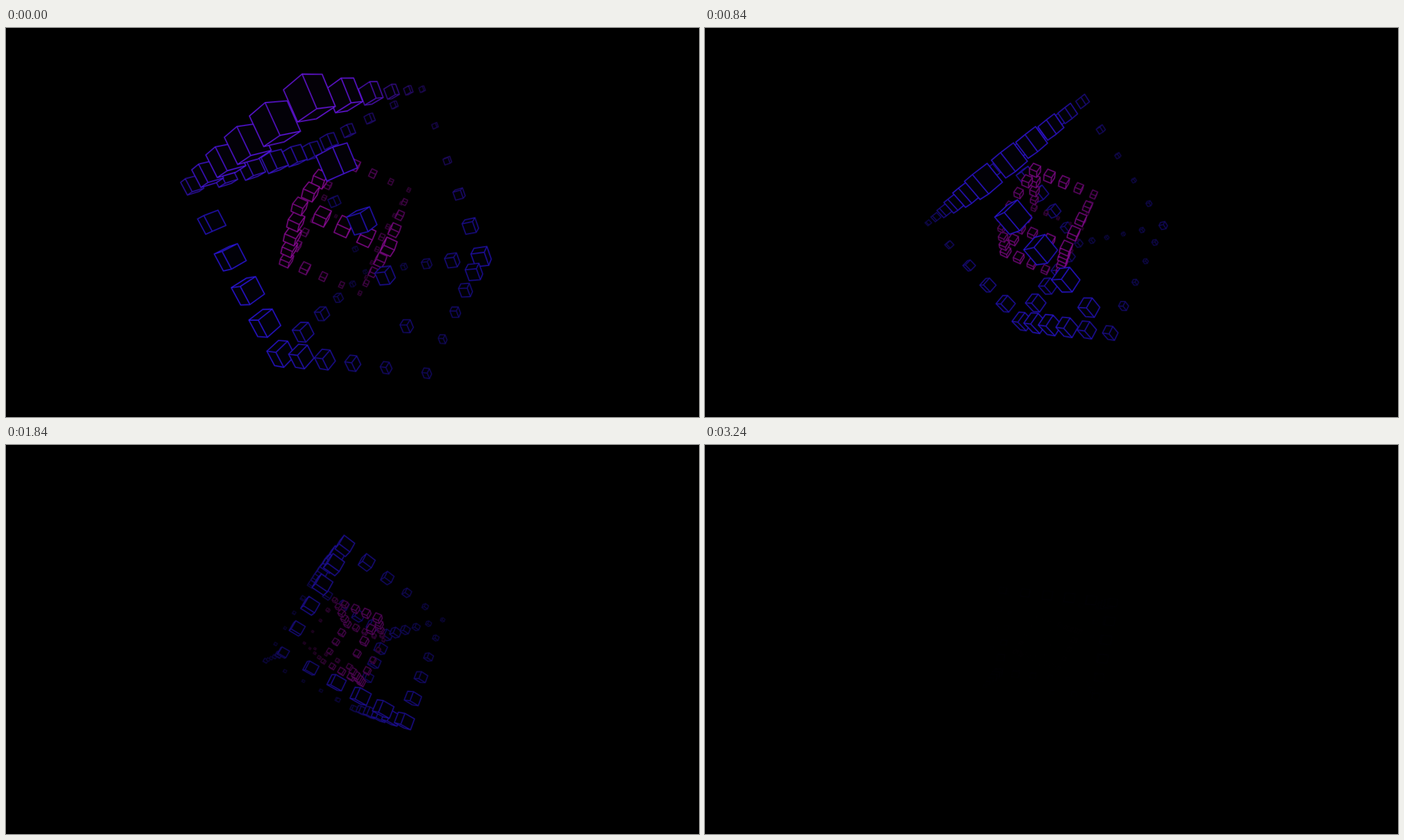
Animation, 998 px wide and 561 px high, one loop 3280 ms. Source, as an HTML page with a canvas:

```html
<!DOCTYPE html>
<html lang="en">
<head>
<meta charset="utf-8">
<title>Nested wire cubes</title>
<style>
  html, body { margin: 0; width: 100%; height: 100%; overflow: hidden; background: #000; }
  canvas { display: block; width: 998px; height: 561px; }
</style>
</head>
<body>
<canvas id="stage" width="998" height="561"></canvas>
<script>
const ctx = document.getElementById('stage').getContext('2d');
const LOOP = 3280, TICK = 40;
const TIMES = [0, 320, 840, 1840, 2600, 3280];

// Each pose holds three corners next to the nearest one: x, y, nearness.
const outer = {
  steps: 5, center: [495.5, 283], signs: [-1, 1, 1], peak: -1.6,
  poses: [
    [-206.2, -51, .092, 101.5, -190.4, .022, 73, 142, .339],
    [-191.9, -28.5, .058, 75.2, -177.2, .07, 68.5, 134, .297],
    [-169, -2, .028, 42.7, -156.3, .117, 67.6, 120.2, .233],
    [-127.2, 29.4, -.046, -6.3, -113.6, .172, 65.3, 95.8, .165],
    [-101.3, 41.3, -.082, -35.3, -85.3, .155, 62.5, 81.1, .138],
    [-80, 50, -.11, -59, -62, .13, 59, 69, .115]
  ],
  color(x, y, q, t) {
    const warm = clamp(-y / 100) * clamp(.5 + q * 1.2) * clamp(1 - t / 1000);
    return [44 + 62 * warm, 22, 228];
  }
};
const inner = {
  steps: 4, center: [493, 283.5], signs: [1, 1, 1], peak: 2.1,
  poses: [
    [47.3, 26.1, .184, -88, 50.5, .011, -16.5, -98, -.009],
    [37.5, 26.3, .162, -78, 47, 0, -15.5, -91, .022],
    [22.3, 28.1, .173, -63.2, 41, -.053, -17.2, -76, .028],
    [1.5, 30, .18, -38.8, 31, -.08, -19, -59, .01],
    [-5.5, 31.5, .13, -28, 25, -.07, -19, -46.5, -.03],
    [-11, 30, .1, -18, 21, -.06, -16, -36, -.04]
  ],
  color() { return [136, 10, 146]; }
};

function clamp(v) { return Math.max(0, Math.min(1, v)); }

// Smooth curve through the poses.
function poseAt(poses, t) {
  const last = TIMES.length - 1;
  let i = 0;
  while (i < last - 1 && t >= TIMES[i + 1]) i++;
  const span = TIMES[i + 1] - TIMES[i], k = (t - TIMES[i]) / span;
  const slope = (n, c) => {
    const a = Math.max(0, n - 1), b = Math.min(last, n + 1);
    return (poses[b][c] - poses[a][c]) / (TIMES[b] - TIMES[a]);
  };
  return poses[i].map((p, c) => {
    const end = poses[i + 1][c], k2 = k * k, k3 = k2 * k;
    return p * (2 * k3 - 3 * k2 + 1) + end * (3 * k2 - 2 * k3) +
      span * (slope(i, c) * (k3 - 2 * k2 + k) + slope(i + 1, c) * (k3 - k2));
  });
}

function along(origin, axes, w) {
  return origin.map((v, c) => v + axes[0][c] * w[0] + axes[1][c] * w[1] + axes[2][c] * w[2]);
}

function cubesOf(box, t) {
  const p = poseAt(box.poses, t), n = box.steps;
  const corners = [p.slice(0, 3), p.slice(3, 6), p.slice(6, 9)];
  const near = [0, 1, 2].map(c => corners[0][c] + corners[1][c] + corners[2][c]);
  const axes = corners.map(corner => corner.map((v, c) => (v - near[c]) / n));
  const [u, v, w] = axes;
  const hand = Math.sign(
    u[0] * (v[1] * w[2] - v[2] * w[1]) -
    u[1] * (v[0] * w[2] - v[2] * w[0]) +
    u[2] * (v[0] * w[1] - v[1] * w[0]));
  const list = [];
  for (let i = 0; i <= n; i++) for (let j = 0; j <= n; j++) for (let k = 0; k <= n; k++) {
    const at = [i, j, k];
    if (at.filter(a => a === 0 || a === n).length < 2) continue;
    const phase = at.reduce((sum, a, c) => sum + a * box.signs[c], 0);
    const wave = Math.cos(2 * Math.PI * (phase - box.peak - t * .003) / 14);
    const size = (.325 + .21 * wave) * (1 - t * .00005);
    list.push({ box, axes, hand, size, pos: along(near, axes, at) });
  }
  return list;
}

function drawCube(cube, t) {
  const { box, axes, hand, size, pos } = cube;
  const [x, y, q] = pos, h = size / 2;
  const fade = Math.cos(Math.PI / 2 * t / LOOP);
  const light = Math.min(1, (.15 + 1.55 * size) * (1 + .8 * q)) * fade;
  const tint = m => 'rgb(' + box.color(x, y, q, t).map(c => Math.round(c * light * m)) + ')';
  const project = w => {
    const [px, py, pq] = along(pos, axes, w);
    return [box.center[0] + px / (1 - pq), box.center[1] + py / (1 - pq)];
  };
  const path = new Path2D();
  for (let a = 0; a < 3; a++) for (const side of [-1, 1]) {
    const b = (a + 1) % 3, c = (a + 2) % 3;
    const quad = [[-1, -1], [1, -1], [1, 1], [-1, 1]].map(([m, n]) => {
      const w = [];
      w[a] = side * h; w[b] = m * h; w[c] = n * h;
      return project(w);
    });
    const area = (quad[2][0] - quad[0][0]) * (quad[3][1] - quad[1][1]) -
                 (quad[2][1] - quad[0][1]) * (quad[3][0] - quad[1][0]);
    if (area * side * hand <= 0) continue;
    quad.forEach(([px, py], i) => i ? path.lineTo(px, py) : path.moveTo(px, py));
    path.closePath();
  }
  ctx.fillStyle = tint(.035);
  ctx.fill(path);
  ctx.globalAlpha = .22;
  ctx.lineWidth = 3;
  ctx.strokeStyle = tint(1);
  ctx.stroke(path);
  ctx.globalAlpha = 1;
  ctx.lineWidth = 1.1;
  ctx.stroke(path);
}

function draw(t) {
  ctx.fillStyle = '#000';
  ctx.fillRect(0, 0, 998, 561);
  ctx.lineJoin = 'round';
  [...cubesOf(outer, t), ...cubesOf(inner, t)]
    .sort((a, b) => a.pos[2] - b.pos[2])
    .forEach(cube => drawCube(cube, t));
}

const start = performance.now();
function loop() {
  const t = (performance.now() - start) % LOOP;
  draw(Math.floor(t / TICK) * TICK);
  requestAnimationFrame(loop);
}
loop();
</script>
</body>
</html>
```
